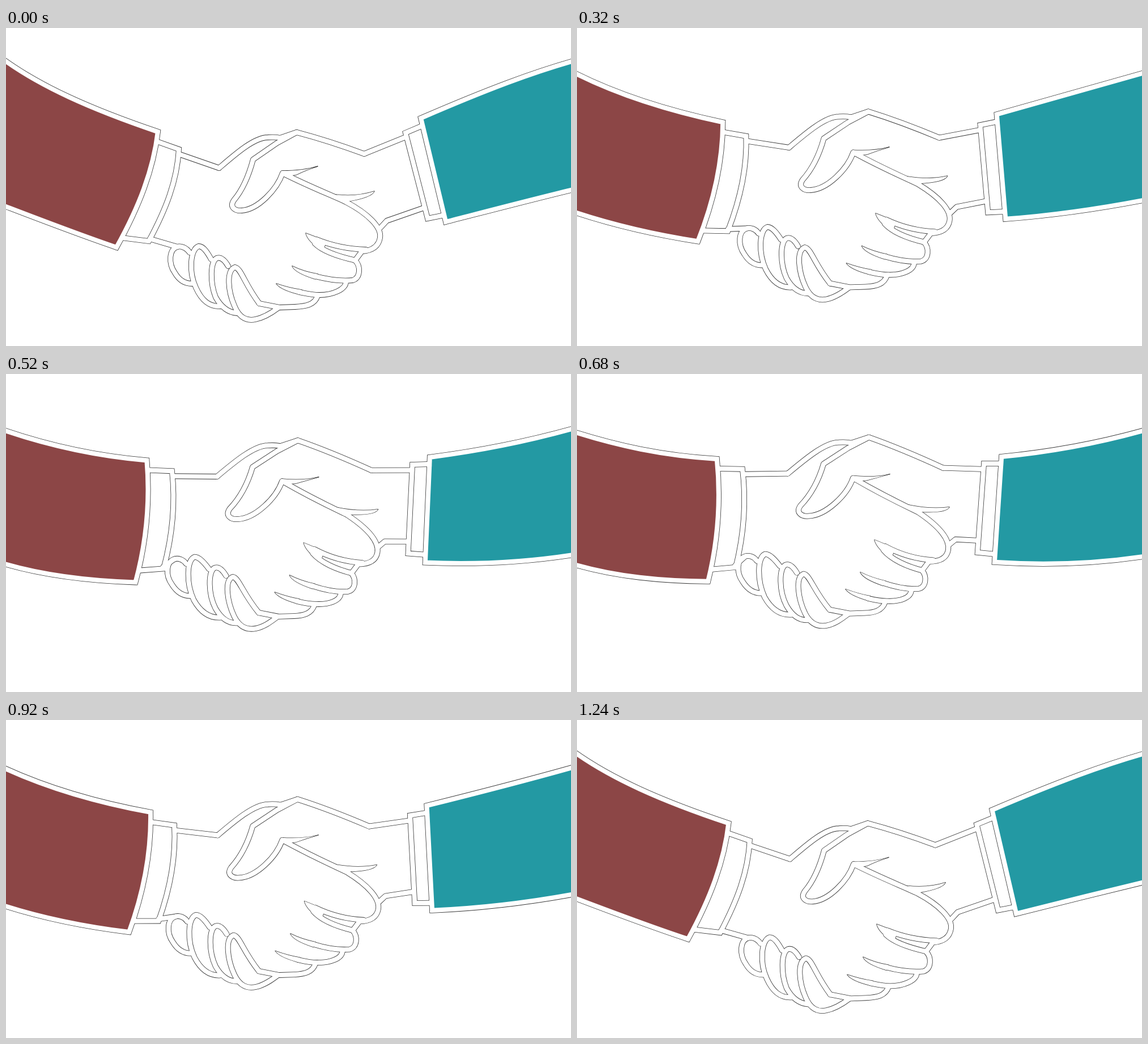
An HTML page with a canvas that plays this animation: 997x561 px, repeating every 1.28 s.

```html
<!DOCTYPE html>
<html lang="en">
<head>
<meta charset="utf-8">
<title>Handshake</title>
<style>
  html, body { margin: 0; width: 100%; height: 100%; overflow: hidden; background: #fff; }
  canvas { display: block; }
</style>
</head>
<body>
<canvas id="stage" width="997" height="561"></canvas>
<script>
const ctx = document.getElementById('stage').getContext('2d');
const LOOP = 1280, STEP = 40, INK = '#333';

// Each arm part: path with the hands low, path with the hands high.
const sleeves = [
  { color: '#8c4646',
    low: 'M-8,53 C60,103 150,143 268,183 C260,250 235,315 195,387 C130,365 60,338 -8,312',
    high: 'M-8,101 C70,126 150,144 247,150 C254,222 249,294 231,366 C150,365 70,358 -8,335' },
  { color: '#2399a3',
    low: 'M1005,57 C930,78 850,108 732,159 L776,342 C850,323 930,302 1005,284',
    high: 'M1005,98 C920,122 840,137 749,146 L737,332 C830,338 920,334 1005,321' }
];
const cuffs = [
  { low: 'M266,200 L305,214 C302,270 282,320 252,376 L204,370',
    high: 'M246,167 L292,168 C299,225 294,285 280,341 L236,345' },
  { low: 'M738,171 L705,185 L744,336 L774,330',
    high: 'M752,158 L718,158 L707,315 L738,318' }
];
const wrists = [
  { low: 'M307,223 L376,247', high: 'M295,177 L372,176' },
  { low: 'M254,372 L302,386', high: 'M279,338 L297,322' },
  { low: 'M632,222 L706,192', high: 'M646,166 L717,168' },
  { low: 'M661,352 L672,340 L738,317', high: 'M656,302 L668,292 L708,294' }
];

// Anchors in the low pose and their shift to the high pose: x, y, dx, dy.
const anchors = [
  [376,247,-4,-71], [462,193,0,-72], [513,184,2,-72], [436,232,-1,-73],
  [398,312,-8,-71], [488,256,-1,-72], [550,244,2,-67], [588,297,2,-63],
  [650,289,7,-53], [632,222,14,-56], [660,366,-5,-59], [529,362,-4,-69],
  [616,410,-7,-63], [627,430,-9,-63], [603,450,-10,-66], [553,473,-6,-70],
  [505,420,-5,-70], [477,452,-3,-71], [483,494,-2,-70], [433,516,1,-70],
  [404,422,-4,-69], [372,406,-4,-69], [340,385,-8,-67], [302,386,-5,-64],
  [289,405,-6,-65], [328,451,-4,-64], [378,491,0,-66]
];

function warp(x, y) {
  let sum = 0, dx = 0, dy = 0;
  for (const [ax, ay, mx, my] of anchors) {
    const w = 1 / (((x - ax) ** 2 + (y - ay) ** 2) ** 1.6 + 1);
    sum += w; dx += w * mx; dy += w * my;
  }
  return [x + dx / sum, y + dy / sum].map(v => v.toFixed(1)).join();
}

const raise = low => ({ low, high: low.replace(/(\d+),(\d+)/g, (_, x, y) => warp(+x, +y)) });

const bands = [
  // tops of both hands and the thumb
  'M376,247 C405,222 438,193 462,193 Q474,192 484,194',
  'M632,222 Q570,199 513,184 L478,203 L436,232 C428,262 418,285 402,304 C394,316 404,323 416,322 C445,320 478,285 488,256',
  'M513,184 L484,194',
  // fingers on the right
  'M490,257 C540,282 575,295 600,307 C640,328 663,352 660,370 C657,388 642,393 628,394 L616,410',
  'M548,373 C575,384 605,390 635,391',
  'M545,380 C560,395 590,404 617,410',
  'M616,410 C626,420 626,440 612,445 C590,447 565,443 546,438',
  'M600,447 C600,462 575,471 553,471 C540,471 528,468 518,466',
  'M550,472 C545,488 530,491 510,492 L483,493 L447,486',
  // fingers on the left
  'M324,396 C318,387 308,384 302,386 C288,390 286,415 298,432 C305,444 315,451 328,451',
  'M362,408 C355,395 348,385 340,385 C325,390 322,430 335,458 C345,480 358,492 378,491',
  'M392,420 C385,408 378,404 372,406 C360,412 360,450 370,475 C380,493 392,502 408,503',
  'M447,486 C420,450 415,424 404,422 C388,428 392,465 403,490 C412,512 425,517 440,514 C455,511 468,503 480,494'
].map(raise);

const creases = [
  'M487,252 Q525,252 550,244 Q530,250 512,259 L490,262 Z',
  'M582,294 Q620,298 650,288 Q645,299 603,306 Z',
  'M529,362 Q545,368 565,376 L560,393 Q533,378 529,362 Z',
  'M505,420 Q525,430 550,434 L546,443 Q510,432 505,420 Z',
  'M477,451 Q500,459 522,462 L518,470 Q485,462 477,451 Z'
].map(raise);

const NUM = /-?\d+(\.\d+)?/g;
for (const part of [...sleeves, ...cuffs, ...wrists, ...bands, ...creases]) {
  part.ends = part.high.match(NUM).map(Number);
}

function shape({ low, ends }, k) {
  let i = 0;
  return new Path2D(low.replace(NUM, n => (+n + (ends[i++] - n) * k).toFixed(2)));
}

// 0 = hands low, 1 = hands high; the way down lags a little near its end.
function lift(t) {
  const wave = 0.5 - 0.5 * Math.cos(2 * Math.PI * t / LOOP);
  const lag = t > 900 ? 0.045 * Math.sin(Math.PI * (t - 900) / (LOOP - 900)) : 0;
  return (wave + lag) / 0.985;
}

function stroke(paths, color, width, join, cap) {
  ctx.strokeStyle = color;
  ctx.lineWidth = width;
  ctx.lineJoin = join;
  ctx.lineCap = cap;
  paths.forEach(p => ctx.stroke(p));
}

function draw(t) {
  const k = lift(t);
  const pose = parts => parts.map(p => shape(p, k));
  const sleeve = pose(sleeves), cuff = pose(cuffs);
  const hand = pose([...wrists, ...bands]), crease = pose(creases);
  const lines = (color, width) => {
    stroke([...sleeve, ...cuff], color, width, 'miter', 'butt');
    stroke(hand, color, width, 'round', 'round');
  };

  ctx.fillStyle = '#fff';
  ctx.fillRect(0, 0, 997, 561);
  lines(INK, 9.8);
  stroke(crease, INK, 1.5, 'round', 'round');
  sleeve.forEach((p, i) => {
    ctx.fillStyle = sleeves[i].color;
    ctx.fill(p);
  });
  lines('#fff', 8.2);
  ctx.fillStyle = '#fff';
  crease.forEach(p => ctx.fill(p));
}

function tick() {
  draw(Math.floor(performance.now() % LOOP / STEP) * STEP);
  requestAnimationFrame(tick);
}
tick();
</script>
</body>
</html>
```
